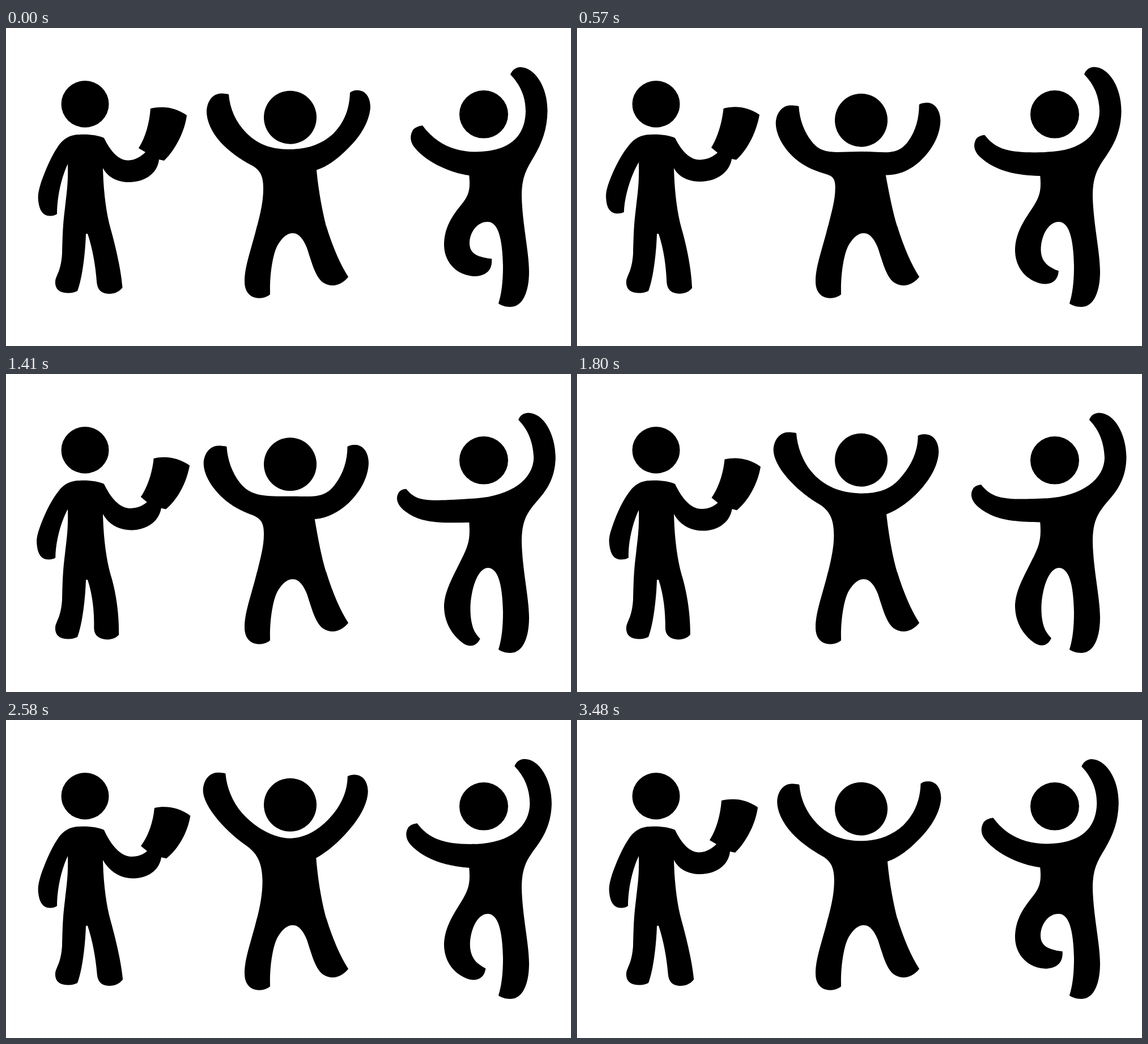
Write an HTML page that moves like this. It is 997 by 561 pixels and loops after 3.51 s.

```html
<!DOCTYPE html>
<html lang="en">
<head>
<meta charset="utf-8">
<title>Three dancing figures</title>
<style>
  html, body { margin: 0; width: 100%; height: 100%; overflow: hidden; background: #fff; }
  svg { display: block; width: 100%; height: 100%; }
</style>
</head>
<body>
<svg id="stage" viewBox="0 0 997 561"></svg>
<script>
const LOOP = 3510, STEP = 30;
const stage = document.getElementById('stage');

// Tracks are time, value pairs joined by a monotone cubic.
function track(...pairs) {
  const keys = [];
  for (let i = 0; i < pairs.length; i += 2) keys.push({ t: pairs[i], v: pairs[i + 1] });
  const secant = i => (keys[i + 1].v - keys[i].v) / (keys[i + 1].t - keys[i].t);
  const last = keys.length - 1;
  keys.forEach((key, i) => {
    if (i === 0) key.slope = secant(0);
    else if (i === last) key.slope = secant(last - 1);
    else {
      const a = secant(i - 1), b = secant(i);
      key.slope = a * b > 0 ? 2 * a * b / (a + b) : 0;
    }
  });
  return time => {
    if (time >= keys[last].t) return keys[last].v;
    const i = keys.findIndex(key => key.t > time) - 1;
    const a = keys[i], b = keys[i + 1], span = b.t - a.t;
    const u = (time - a.t) / span, w = 1 - u;
    return w * w * ((1 + 2 * u) * a.v + u * span * a.slope)
         + u * u * ((1 + 2 * w) * b.v - w * span * b.slope);
  };
}

const armBack = track(0, 0, 570, .8, 880, 1.06, 1020, 1, 1720, 0, 3480, 0);
const armShort = track(0, 0, 1020, 0, 1750, 1, 1800, 1, 2280, .04, 2500, 0, 3480, 0);
const step = track(0, 0, 570, .4, 1020, 1, 1400, 1.04, 1800, .93, 2280, -.08, 2700, -.12, 3480, -.12);
const tilt = track(0, 0, 570, 1, 1020, .87, 1800, .34, 2280, .2, 2880, 0, 3480, 0);
const lower = track(0, 0, 570, 0, 1020, .37, 1800, .61, 2280, .83, 2880, 1, 3480, 0);
const nod = track(0, 0, 570, .5, 1020, .67, 1800, -.6, 2280, -1.06, 2880, -.42, 3480, -.1);
const crouch = track(0, 0, 570, .81, 1020, 1, 1800, .33, 2280, 0, 3480, 0);
const stretch = track(0, 0, 1020, 0, 1800, .67, 2280, 1, 2880, .33, 3480, .09);
const reach = track(0, 0, 570, .54, 1020, 1, 1180, 1.06, 1800, .75, 2280, .5, 2880, .18, 3480, .02);
const swing = track(0, 0, 570, .36, 1020, .83, 1640, 1.06, 1800, 1, 2280, .75, 2880, .31, 3480, .02);

const ellipse = (x, y, rx, ry) =>
  `M${x - rx} ${y} a${rx} ${ry} 0 1 0 ${2 * rx} 0 a${rx} ${ry} 0 1 0 ${-2 * rx} 0Z`;

const numbers = path => path.match(/-?[\d.]+/g).map(Number);
const moving = [];

// Each extra pose is mixed into the base path by the track of the same index.
function shape(base, poses = [], tracks = []) {
  const node = document.createElementNS('http://www.w3.org/2000/svg', 'path');
  node.setAttribute('d', base);
  stage.append(node);
  if (!poses.length) return;
  const start = numbers(base);
  const deltas = poses.map(pose => numbers(pose).map((n, i) => n - start[i]));
  moving.push(time => {
    const weights = tracks.map(f => f(time));
    let i = 0;
    node.setAttribute('d', base.replace(/-?[\d.]+/g, () => {
      const n = weights.reduce((sum, w, k) => sum + w * deltas[k][i], start[i]);
      i++;
      return +n.toFixed(3);
    }));
  });
}

// Figure with a sheet of paper
shape(ellipse(139.5, 134.3, 42, 41.2));
shape('M130 188 C145 187 162 189 173 194 L171 247 C172 290 177 326 184 352 L144 363 L141 363 C140 395 135 440 126 464 C120 467 114 467.5 108 467.5 C93 467 86 459 87 447 C88 436 97 430 99 398 C100 365 100 350 104 318 C107 290 110 275 109 238Z');
shape('M130 188 C112 188 101 196 93 207 C79 227 68 255 62 272 C57 288 56 296 57 305 C59 323 66 331 77 331.5 C84 331.5 87 330 90 328 C90 300 97 264 110 238 L130 210Z', [
  'M130 188 C112 188 100 196 92 206 C77 223 64 249 57 267 C51 282 49 292 50 301 C51 318 58 326 69 326.3 C76 326.3 79 325 81 324 C82 300 92 264 108 238 L130 210Z',
  'M130 188 C112 188 101 196 93 207 C79 225 68 252 62 270 C57 284 56 292 57 300 C59 319 66 327 77 327.3 C84 327.3 88 326 91 324 C90 300 97 264 110 238 L130 210Z',
], [armBack, armShort]);
shape('M184 352 C192 380 203 425 205.5 458 C199 466 192 468.5 182 469 C168 468.5 161 462 160 447 C158 420 153 390 144 363 L150 335 L175 335Z', [
  'M184 352 C193 380 200 420 199.5 460 C194 466 188 468 179 468.5 C165 468 156 462 155.5 449 C156 420 153 390 144 363 L150 335 L175 335Z',
], [step]);
shape('M173 194 C185 219 200 234 216 233.5 C228 233 238 227 246 219 L234 212 C246 193 253 168 255 142 C278 137 299 140 319 154 C316 180 300 214 279 234 L270 232 C268 254 248 272 216 272 C196 272 179 263 171 247 L155 247 L155 200Z', [
  'M173 194 C185 218 200 233 217 232.5 C230 232 240 227 248 220 L237 211 C248 193 256 167 258.5 142 C281 136 303 140 322 153 C317 182 302 214 281 232.5 L273 231 C270 252 249 271 217 271 C197 271 179 263 171 247 L155 247 L155 200Z',
  'M173 194 C186 223 204 242 222 241.5 C234 241.5 242 238 249 232 L238 223 C250 207 260 182 262 156 C285 151 308 157 325.5 170 C321 198 305 228 283 245 L274 243 C271 265 251 280 225 280 C202 280 183 268 171 247 L155 247 L155 200Z',
], [tilt, lower]);

// Figure with both arms raised
const bounce = [crouch, stretch];
shape(ellipse(501.5, 157.7, 46.5, 47), [ellipse(501.5, 167.7, 46.5, 47)], [nod]);
shape('M443 349 C433 390 421 420 421 447 C421 467 432 476.5 447 476.5 C455 476.5 461 474 466 470 C465 430 472 395 480 382 C488 369 496 362 506 362 C516 362 524 371 531 388 C539 412 545 436 557 447 C570 458 590 457 604 439 C590 417 577 388 565 349Z');
shape('M393 117 C395 142 405 166 425 186 C448 209 475 214 501 214 L520 350 L443 350 C451 320 454 302 454 282 C454 258 446 249 433 242 C412 231 393 217 379 202 C362 183 354 163 354 147 C355 127 366 116 379 115.5 C384 115.5 389 116 393 117Z', [
  'M391 143 C392 166 400 188 412 204 C430 229 455 219 501 219 L520 350 L443 350 C450 322 456 302 456 284 C457 268 453 264 440 261 C420 257 402 250 386 237 C363 217 350 193 350 172 C351 153 363 142 375 141.5 C382 141.5 387 142 391 143Z',
  'M385 85 C387 109 397 136 414 156 C437 183 472 206 501 206.5 L520 350 L443 350 C449 325 452 305 452 285 C451 250 443 232 424 216 C405 201 388 185 373 167 C354 144 345 127 345 114 C346 95 358 83.5 371 83.5 C376 83.5 381 84 385 85Z',
], bounce);
shape('M501 214 C530 214 556 206 577 187 C599 165 606 140 607 114 C612 110 617 109.5 622 110 C636 111 643 124 643 140 C641 168 622 195 603 213 C585 231 568 244 548 250.5 C551 285 558 322 565 350 L480 350Z', [
  'M501 219 C547 219 567 231 586 203 C598 185 603 163 603 140 C608 137.5 613 137 618 137 C632 138 641 152 641 170 C640 199 624 224 605 241 C588 255 568 264 544 261.5 C551 295 557 325 565 350 L480 350Z',
  'M501 206.5 C526 206 548 190 566 170 C590 145 601 118 601 93.5 C606 91 611 90.8 616 91.3 C630 93 637 106 637 121 C636 145 620 170 603 190 C588 208 568 227 547 240.5 C550 282 557 322 565 350 L480 350Z',
], bounce);

// Figure on one leg
shape(ellipse(843, 152.3, 43, 42.3));
shape('M822 262 L830 225 L895 225 L910 296 C911 345 923 395 923 430 C923 465 912 491.5 891 492 C884 492 876 491 869 486 C874 470 877 450 877 420 C876 370 868 342 850 342 L830 342Z');
shape('M735 172 C757 202 788 218 828 218.5 L850 250 L817 260 C780 255 741 235 722 212 C713 202 712 190 718 180 C721 176 727 173 735 172Z', [
  'M706 203 C726 228 747 224 828 219.5 L850 250 L818 262 C757 263 730 263 701 240 C691 231 686 220 693 209 C696 205 700 203.5 706 203Z',
], [reach]);
shape('M890 82 C907 100 917 120 917 147 C916 189 892 218 828 218.5 L825 300 L910 297 C910 265 917 251 931 228 C946 203 955 178 955.5 147 C956 104 933 69 907 69 C898 70 893 75 890 82Z', [
  'M904 81 C922 99 930 122 931 148 C930 185 893 215 828 219.5 L825 300 L910 297 C910 260 918 246 938 223 C957 202 969 180 969.5 147 C969 105 948 68.5 921 68.5 C912 69 906 74 904 81Z',
], [swing]);
shape('M817 258 C820 284 817 295 804 311 C787 332 773 352 773 384 C774 416 798 437.5 828 438 C846 437 859 428 857 407 C848 406 848 406 840 404 C827 401 818 394 818 380 C818 360 832 342 849 342 L870 300 L870 235Z', [
  'M817 258 C820 292 816 303 801 332 C786 362 773 385 773 411 C774 440 788 461 808 475 C820 482 831 479 837 466 C833 462 830 458 827 453 C821 441 819 425 819.5 408 C822 372 834 342 851 342 L870 300 L870 235Z',
], [swing]);

const begin = performance.now();
function draw() {
  const elapsed = (performance.now() - begin) % LOOP;
  const time = Math.floor(elapsed / STEP) * STEP;
  moving.forEach(update => update(time));
  requestAnimationFrame(draw);
}
draw();
</script>
</body>
</html>
```
